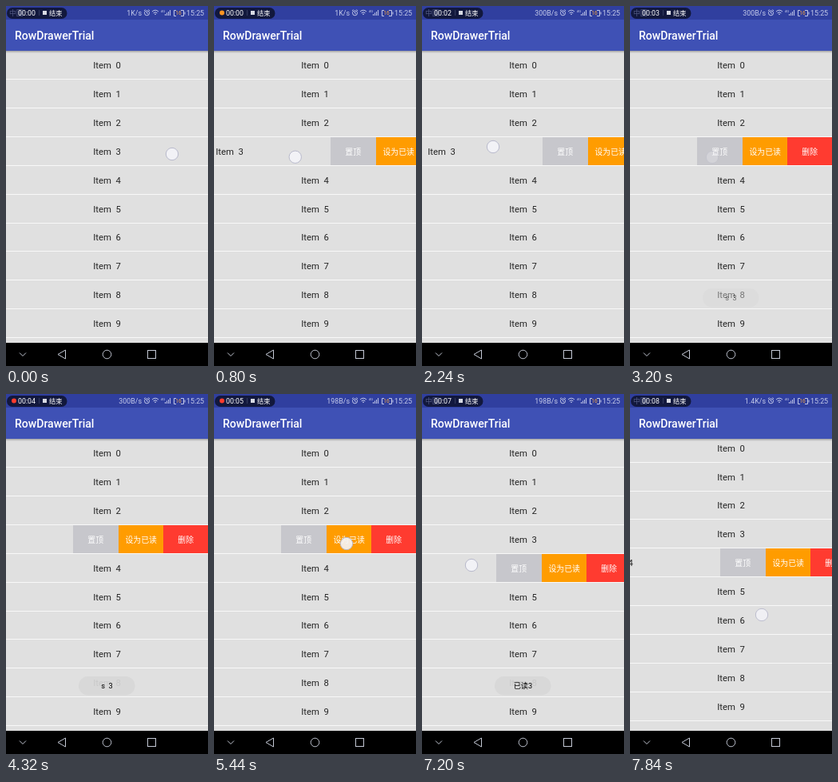
Recreate the animation shown at these times as an HTML page. Size 253 by 450 pixels, loop 8 s.

```html
<!DOCTYPE html>
<html lang="en">
<head>
<meta charset="utf-8">
<title>Swipe list</title>
<style>
  html, body { margin: 0; width: 100%; height: 100%; overflow: hidden; background: #000; }
  svg { display: block; width: 253px; height: 450px; }
  text { font-family: Roboto, "Noto Sans CJK SC", "Noto Sans CJK", sans-serif; white-space: pre; }
  .mid { text-anchor: middle; }
  .item { font-size: 11.3px; fill: #242424; }
  .label { font-size: 9.9px; fill: #fff; }
  .status { font-size: 8.9px; fill: #c6cceb; }
  .line { fill: none; stroke: #c0c6e8; }
  .nav { fill: none; stroke: #c3c8d4; }
</style>
</head>
<body>
<svg viewBox="0 0 253 450">
  <defs>
    <linearGradient id="shade" x2="0" y2="1">
      <stop stop-color="#000" stop-opacity=".28"/>
      <stop offset="1" stop-color="#000" stop-opacity="0"/>
    </linearGradient>
  </defs>
  <rect width="253" height="450" fill="#e0e0e0"/>
  <g id="list"></g>

  <g id="toast">
    <rect x="91" y="353" width="70.5" height="23.5" rx="11.7" fill="#d7d7d7" fill-opacity=".92"/>
    <text id="note" class="mid" x="126.4" y="368.3" font-size="9.2" fill="#000"></text>
  </g>

  <rect y="17" width="253" height="39" fill="#3f51b5"/>
  <rect y="56" width="253" height="3" fill="url(#shade)"/>
  <text x="11" y="42" font-size="14.06" font-weight="500" fill="#fff">RowDrawerTrial</text>

  <rect width="253" height="17" fill="#303f9f"/>
  <rect x="1" y="2" width="75.5" height="14" rx="7" fill="#12183d"/>
  <text id="carrier" x="4" y="11.8" font-size="8.8" fill="#535b86">中国</text>
  <circle id="dot" cx="10" cy="8.5" r="3"/>
  <text id="timer" x="15" y="11.8" font-size="8.8" fill="#fff"></text>
  <path d="M41.5 5v7" stroke="#3c4468" stroke-width=".8"/>
  <rect x="46" y="6" width="5" height="5" fill="#d8dae4"/>
  <text x="54" y="11.8" font-size="8.2" fill="#fff">结束</text>

  <text id="speed" class="status" x="170" y="11.8" text-anchor="end"></text>
  <g class="line">
    <circle cx="176.5" cy="8.8" r="3"/>
    <path d="M176.5 7v2l1.3.8M173 6l1.6-1.5M180 6l-1.6-1.5"/>
    <path d="M183 7q4-3.6 8 0M184.6 8.8q2.4-2.2 4.8 0M186 10.5q1-1 2 0"/>
    <path d="M199.5 12v-2M201.5 12v-3.5M203.5 12v-5M205.5 12v-7"/>
    <path d="M213 5.5h-2.5v7h2.5M219 5.5h3.5v7h-3.5M224 7.5v3"/>
  </g>
  <text x="193.8" y="7.8" font-size="4.4" fill="#c6cceb">4G</text>
  <text class="mid" x="216" y="11.4" font-size="6.5" fill="#f0a03c">16</text>
  <text class="status" x="226" y="11.8">15:25</text>

  <rect y="421" width="253" height="29" fill="#000"/>
  <g class="nav">
    <path d="M17 433.5l4 4 4-4"/>
    <path d="M74.5 430v11l-9.5-5.5z"/>
    <circle cx="126.5" cy="435.5" r="5.3"/>
    <rect x="177.5" y="430.5" width="10" height="10"/>
  </g>

  <circle id="touch" r="7.7" fill="#f4f4f8" fill-opacity=".9" stroke="#b8b9cb"/>
</svg>
<script>
const LOOP = 8000, STEP = 160;
const TOP = 56, PITCH = 35.9, ROWS = 11;
const BUTTON_W = 56.3, OPEN = -169;
const SNAP = 300, FADE = 180, TOAST = 2240;
const BUTTONS = [["置顶", "#c7c7cc"], ["设为已读", "#ff9c00"], ["删除", "#ff3b30"]];
const SPEEDS = ["1K/s", "300B/s", "198B/s", "1.4K/s"];

const $ = id => document.getElementById(id);
const clamp = (v, lo = 0, hi = 1) => Math.max(lo, Math.min(hi, v));
const smooth = p => p * p * (3 - 2 * p);

const swipe = (row, start, end, x, y, dx, dy) => ({ row, start, end, x, y, dx, dy });
const tap = (end, x, y, note) => ({ ...swipe(null, end - 80, end, x, y, 0, 0), note });

// A vertical swipe scrolls the list and closes the open row.
const closing = swipe(4, 7520, 7760, 165, 282.4, 0, -6.4);
const gestures = [
  swipe(3, 0, 1280, 208, 185, -170, 6),
  swipe(3, 1440, 1760, 60, 182, 170, 0),
  swipe(3, 1920, 2400, 191, 178, -153, -3),
  tap(3040, 103, 189, "s  3"),
  tap(5440, 166, 187, "已读3"),
  tap(6240, 134, 193),
  swipe(3, 6560, 6760, 70, 190, 140, 0),
  swipe(4, 6880, 7200, 222, 218, -160, -4),
  closing
];

const progress = (g, t) => clamp((t - g.start) / (g.end - g.start));
const latest = (t, test) => gestures.findLast(g => g.start <= t && test(g));

// The row follows the finger, then snaps open or shut.
function rowShift(row, t) {
  const g = latest(t, g => g.row === row);
  if (!g) return 0;
  const [base, rest] = g.dx < 0 ? [0, OPEN] : [OPEN, 0];
  const held = clamp(base + g.dx * progress(g, t), OPEN, 0);
  return Math.floor(held + (rest - held) * smooth(clamp((t - g.end) / SNAP)));
}

function rowMarkup(i) {
  const buttons = BUTTONS.map(([label, color], n) => {
    const x = 253 + Math.ceil(n * BUTTON_W);
    return `<rect x="${x}" width="57" height="35" fill="${color}"/>
      <text class="label mid" x="${x + BUTTON_W / 2}" y="22">${label}</text>`;
  }).join("");
  return `<g id="row${i}"><rect y="35" width="253" height="1" fill="#f8f8f8"/>
    <g id="slide${i}"><text class="item mid" x="126.5" y="22">Item  ${i}</text>${buttons}</g></g>`;
}

const move = (id, x, y = 0) => $(id).setAttribute("transform", `translate(${x} ${y})`);
const show = (id, alpha) => $(id).setAttribute("opacity", +alpha);

function drawList(t) {
  const scroll = closing.dy * progress(closing, t);
  for (let i = 0; i < ROWS; i++) {
    move("row" + i, 0, Math.round(TOP + i * PITCH + scroll));
    move("slide" + i, rowShift(i, t));
  }
}

function drawTouch(t) {
  const g = latest(t, () => true), p = progress(g, t);
  move("touch", g.x + g.dx * p, g.y + g.dy * p);
  show("touch", 1 - clamp((t - g.end) / FADE) ** 3);
}

function drawToast(t) {
  const g = latest(t, g => g.note);
  const age = g ? t - g.end : 0;
  $("note").textContent = g ? g.note : "";
  show("toast", clamp(Math.min(age, TOAST - age) / 320));
}

function drawStatus(t) {
  const clock = (t + 180) / 1000, beat = clock % 1;
  $("timer").textContent = "00:0" + Math.floor(clock);
  show("dot", beat >= .45);
  show("carrier", beat < .45);
  $("dot").setAttribute("fill", beat > .8 ? "#ff9422" : "#ff3c2e");
  $("speed").textContent = SPEEDS[Math.floor((t + 1440) / 3040)];
}

function tick() {
  const now = performance.now() % LOOP;
  const t = Math.floor(now / STEP) * STEP;
  drawList(t);
  drawTouch(t);
  drawToast(t);
  drawStatus(t);
  requestAnimationFrame(tick);
}

$("list").innerHTML = Array.from({ length: ROWS }, (_, i) => rowMarkup(i)).join("");
tick();
</script>
</body>
</html>
```
